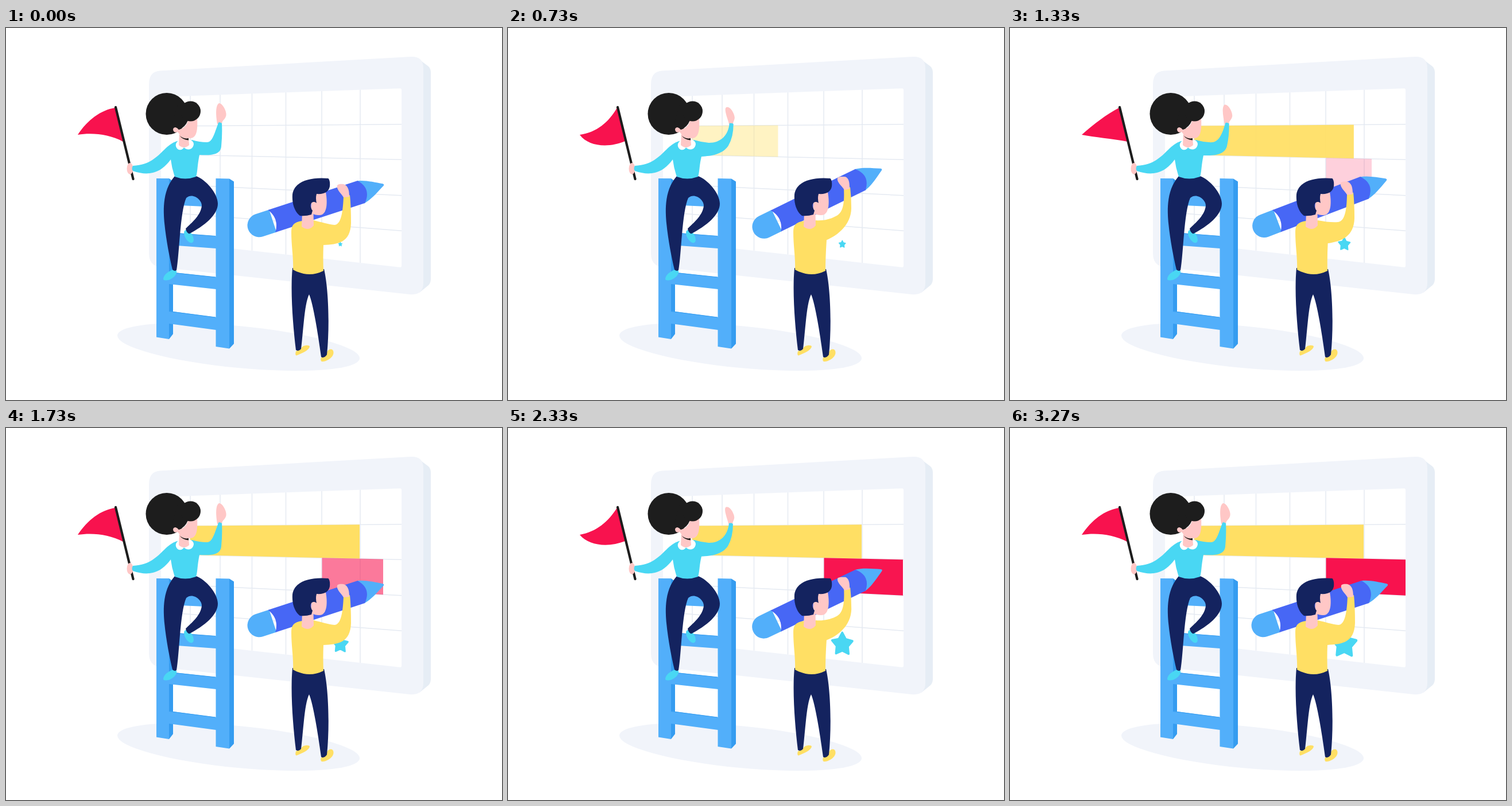
An HTML page that plays this animation: 864 by 648 pixels, repeating every 3340 ms.

```html
<!DOCTYPE html>
<html lang="en">
<head>
<meta charset="utf-8">
<title>Planning board</title>
<style>
html, body { margin: 0; width: 100%; height: 100%; overflow: hidden; background: #fff; }
svg { display: block; width: 100vw; height: 100vh; }
.pale { fill: #f1f4fa; }
.edge { fill: #e6edf5; }
.blue { fill: #52affa; }
.deep { fill: #359cf0; }
.navy { fill: #14235f; }
.skin { fill: #ffc7c6; }
.dark { fill: #1d1d1d; }
.cyan { fill: #49d7f3; }
.gold { fill: #ffdf64; }
.red { fill: #f8124e; }
</style>
</head>
<body>
<svg viewBox="0 0 864 648">
  <!-- board -->
  <path class="edge" d="M716 52L736 67Q740 71 740 78V437Q740 444 736 448L720 461Z"/>
  <path class="pale" d="M268 74.500L705 50Q727 49 727 70V444Q727 466 703 464L270 417Q249 414 249 393V98Q249 76 268 74.500Z"/>
  <path fill="#fff" d="M272 119.900L686 105.200Q689 105 689 108V414Q689 417 686 416.700L272 370.500Q270 370 270 368V122Q270 120 272 119.900Z"/>
  <path id="grid" fill="none" stroke="#e5eaf2" stroke-width="1.500"/>
  <path id="goldBar" class="gold"/>
  <path id="redBar" class="red"/>
  <path id="star" class="cyan" stroke="#49d7f3" stroke-width=".18" stroke-linejoin="round"/>

  <ellipse class="pale" cx="405" cy="555.500" rx="212" ry="36.500" transform="rotate(5.500 405 555.500)"/>

  <!-- ladder -->
  <path class="deep" d="M284 262L291 267V533L284 542ZM389 262.500L397 267.500V550L389 558.500Z"/>
  <path class="blue" d="M262 262H284V542L262 538.500ZM365.500 262L389 262.500V558.500L365.500 555Z"/>
  <path class="blue" d="M284 290L366 293V312L284 308ZM284 356L366 362.500V384L284 378ZM284 425L366 434V455L284 446ZM284 493L366 504V526L284 515Z"/>
  <path fill="none" stroke="#359cf0" d="M284 356.500L365 362.500M284 425.500L365 434M284 493.500L365 504"/>

  <!-- climber -->
  <path id="flag" class="red"/>
  <path d="M191 138L221.500 263" stroke="#1d1d1d" stroke-width="4.200" stroke-linecap="round"/>
  <ellipse class="skin" cx="216" cy="245" rx="5.500" ry="10"/>
  <ellipse class="cyan" cx="318.500" cy="363" rx="6.500" ry="12.500" transform="rotate(-30 318.500 363)"/>
  <path class="cyan" d="M274 438C274 429 284 424 290 421L297 423C299 430 288 439 280 439.500Q275 440 274 438Z"/>
  <path class="navy" d="M294 258C270 285 275 325 276 340C279 370 285 400 290 421Q294 424.500 297 422C302 395 303 320 314 296C325 286 341 299 341 309C340 325 325 338 313 349.500Q314 356 319 358.500C345 345 369 326 369 306C369 288 348 264 331 258Z"/>
  <path id="wavingHand" class="skin"/>
  <path id="jumper" class="cyan"/>
  <path fill="#fff" d="M302 195C297 198 295 202 296 206C298 213 306 215 310 208C314 213 323 213 326 206C328 202 327 198 322 195Z"/>
  <path class="skin" d="M302 183L301 204Q310 212 319 204L318 190Z"/>
  <path class="dark" d="M302 187Q309 194 318 192V195.500Q308 195 302 187Z"/>
  <circle class="dark" cx="280" cy="149.500" r="36.500"/>
  <path class="skin" d="M299 181C291 185 288 173 295 173Q299 174 301 177C313 174 317 166 317 158H333C334 175 333 192 321 192C311 192 303 187 299 181Z"/>
  <path class="dark" d="M300 130L325 132L332 158Q326 164 317 161Q312 173 301 177L290 165Z"/>
  <circle class="dark" cx="321.500" cy="145" r="17.500"/>

  <!-- pencil -->
  <g id="pencil">
    <path class="blue" d="M25-20.500H0A20.500 20.500 0 0 0 0 20.500H25ZM186-20.500C200-18 214-9 227-2Q230 0 227 2C214 9 200 18 186 20.500Z"/>
    <path fill="#4767f5" d="M23-20.500H187Q206 0 187 20.500H23Q37 0 23-20.500Z"/>
  </g>

  <!-- painter -->
  <path class="gold" d="M505 563L514 559C515 552 529 551 529 555C528 562 512 568 506 570.500Q503 570 505 563ZM549 574L558 568C560 557 571 557 570.500 566C570 575 556 582 550 581Q547 579 549 574Z"/>
  <path class="navy" d="M499 418C495 460 500 520 505 561Q510 564 514 559C518 525 520 480 528 464C535 480 543 530 549 573Q554 576 559 569C564 520 562 455 554 420Z"/>
  <path id="sweater" class="gold"/>
  <path id="grip" class="skin"/>
  <path class="skin" d="M516 322H535.500L536 344Q527 355 515 346Z"/>
  <path class="skin" d="M532 300L541 286H557C561 308 558 326 546 326C540 326 535 325 531 321Z"/>
  <path class="navy" d="M499 290C502 268 528 259 561.500 262Q565 266 564 276C562 286 554 290 541 289Q539 296 541 305C535 300 529 305 531 312Q532 316 534 318L532 325Q522 328 512 327C502 319 498 305 499 290Z"/>
</svg>
<script>
const LOOP = 3340, WAVE = LOOP / 2;
const el = id => document.getElementById(id);
const lerp = (a, b, k) => a + (b - a) * k;
const clamp = x => Math.min(1, Math.max(0, x));
const smooth = x => (x = clamp(x), x * x * (3 - 2 * x));
const smoother = x => x * x * x * (x * (6 * x - 15) + 10);

// Row lines run from x = 270 to x = 689, each given by its two end heights.
const rows = [[171, 167.8], [220, 229.2], [271.5, 291.7], [320.5, 353.3]];
const at = ([y0, y1], x) => lerp(y0, y1, (x - 270) / 419);
el('grid').setAttribute('d',
  rows.map(([a, b]) => `M270 ${a}L689 ${b}`).join('') +
  [321, 373, 428.5, 487.5, 550, 617].map(x => `M${x} ${at([120, 105], x)}V${at([370, 417], x)}`).join(''));

const tips = [...Array(10).keys()].map(i => {
  const r = i % 2 ? .5 : .91, a = i * Math.PI / 5;
  return `${r * Math.sin(a)} ${-r * Math.cos(a)}`;
});
el('star').setAttribute('d', `M${tips.join('L')}Z`);

// Two end poses for every part that bends.
const poses = {
  flag: [
    'M190 139C165 143 142 160 125 186C150 182 180 185 204 198Z',
    'M190 139C175 165 155 182 125 186C140 207 175 210 204 197Z'],
  wavingHand: [
    'M368 167C366 155 364 135 371 131C378 131 386 148 383 154C381 160 376 161 376 167Z',
    'M386 169C383 158 376 142 380 138.500C387 135 395 150 395 156C395 161 392 163 392 169Z'],
  jumper: [
    'M298 197C272 205 266 238 221 240Q218 245 221 249C250 259 270 252 287 229Q289 245 294 259Q312 266 331 259C334 250 333 240 337 221C355 222 374 222 375 206Q377 185 376 166Q372 163 370 165C362 187 359 199 350 199Q337 199 324 195Z',
    'M298 197C272 205 266 238 221 240Q218 245 221 249C250 259 270 252 287 229Q289 245 294 259Q312 266 331 259C334 250 333 240 337 224C355 223 374 220 384 205Q393 190 393 167Q390 165 386 166C384 187 371 200 350 200Q337 199 324 195Z'],
  grip: [
    'M588 295C583 287 575 281 577 274C580 271 585 272 588 272C595 274 598 281 598 294Z',
    'M586 282C581 274 572 268 574 261C577 258 584 259 588 259C594 262 595 269 595 280Z'],
  sweater: [
    'M516 336C502 338 497 343 497 355C497 380 501 400 500 421Q527 436 553 423Q552 400 553 378C578 377 600 374 601 340Q601 310 599 291Q593 294 588 293C587 319 584 343 572 343C561 342 549 338 536 335Q526 356 516 336Z',
    'M516 336C502 338 497 343 497 355C497 380 501 400 500 421Q527 436 553 423Q553 400 555 369C574 361 597 343 598 314Q598 295 596 277Q590 280 585 279C586 303 585 322 570 328C561 333 549 336 536 335Q526 356 516 336Z']
};

function mix(a, b, k) {
  const ends = b.match(/[\d.]+/g);
  let i = 0;
  return a.replace(/[\d.]+/g, n => lerp(+n, +ends[i++], k).toFixed(2));
}

function bar(id, top, bottom, x0, x1, min, p) {
  const x = lerp(x0, x1, lerp(min, 1, p));
  const y = (row, x) => at(rows[row], x);
  el(id).setAttribute('d', `M${x0} ${y(top, x0)}L${x} ${y(top, x)}V${y(bottom, x)}L${x0} ${y(bottom, x0)}Z`);
  el(id).setAttribute('opacity', p);
}

function draw(now) {
  const t = now % LOOP;
  const k = smoother(1 - Math.abs(t % WAVE / WAVE * 2 - 1));
  for (const id in poses) el(id).setAttribute('d', mix(...poses[id], k));
  el('pencil').setAttribute('transform',
    `translate(${lerp(441, 446, k)} ${lerp(343.7, 346.3, k)}) rotate(${lerp(-18.1, -26.2, k)})`);

  bar('goldBar', 0, 1, 321, 616, .2, smooth((t - 120) / 1450));
  bar('redBar', 1, 2, 550.5, 689, .47, smooth((t - 890) / 1550));

  const size = lerp(4, 24, smooth(t / 3200));
  el('star').setAttribute('transform', `translate(582.300 376.700) skewY(2) scale(${size} ${size * 1.08})`);
}

const start = performance.now();
function tick() {
  draw(performance.now() - start);
  requestAnimationFrame(tick);
}
tick();
</script>
</body>
</html>
```
